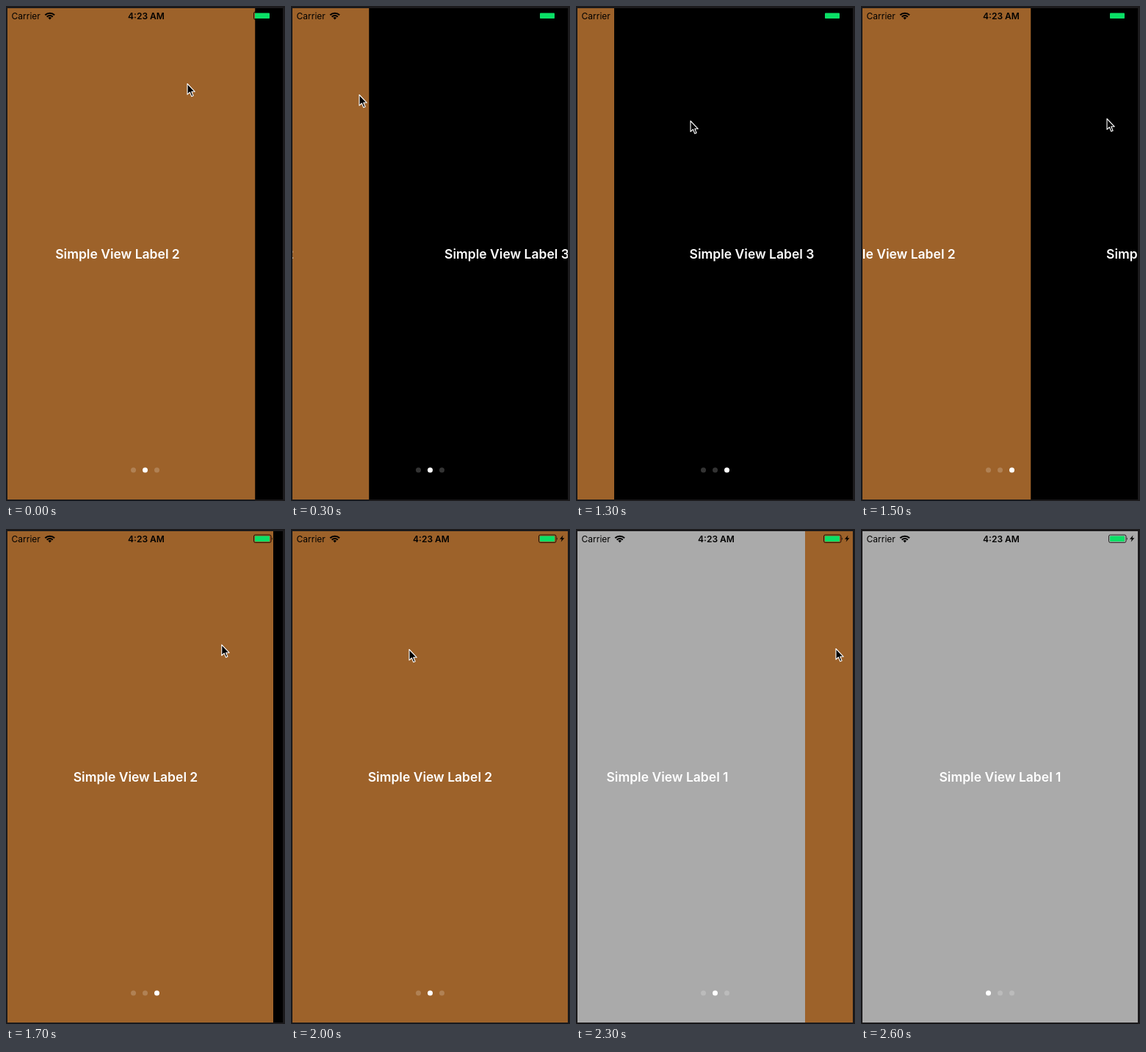
These frames come from a looping animation (380 px wide and 672 px high, 3000 ms). An HTML page:

```html
<!DOCTYPE html>
<html lang="en">
<head>
<meta charset="utf-8">
<title>Page view</title>
<style>
  html, body { margin: 0; width: 100%; height: 100%; overflow: hidden; background: #1b1a1c; }
  svg { display: block; width: 380px; height: 672px; }
  text { font-family: Inter, Roboto, sans-serif; }
  .label { font-size: 17.5px; font-weight: 600; fill: #fff; text-anchor: middle; }
  .status { font-size: 12px; }
  .time { font-weight: 600; text-anchor: middle; }
</style>
</head>
<body>
<svg viewBox="0 0 380 672">
  <defs>
    <clipPath id="screen"><rect x="2" y="3" width="375" height="667"/></clipPath>
  </defs>
  <g clip-path="url(#screen)">
    <rect x="2" y="3" width="375" height="667"/>
    <g id="pages"></g>
    <g class="status">
      <text x="7.6" y="17.6">Carrier</text>
      <g fill="none" stroke="#000" stroke-width="2">
        <path d="M53.3 12.3A9 9 0 0 1 66.1 12.3"/>
        <path d="M55.7 14.7A5.6 5.6 0 0 1 63.7 14.7"/>
      </g>
      <path d="M59.7 18.4L57.4 16.1A3.3 3.3 0 0 1 62 16.1Z"/>
      <text class="time" x="191" y="17.6">4:23 AM</text>
      <rect x="337.5" y="8" width="23.5" height="10.4" rx="2" fill="none" stroke="#000" stroke-opacity=".8"/>
      <path d="M362 11.3Q363.6 13.2 362 15.1Z"/>
      <rect x="339" y="9.5" width="20" height="7.5" rx=".8" fill="#0ae066"/>
      <path d="M370.6 8.6L366 13.8H368.8L367.7 17.6L372.4 12.3H369.5Z"/>
    </g>
    <g id="dots" fill="#fff"></g>
  </g>
  <path id="cursor" d="M0 0V14.6L3.4 11.5L5.8 17.2L8.1 16.2L5.8 10.8H10.3Z"
        stroke="#fff" stroke-width="1.1" stroke-linejoin="round"/>
</svg>
<script>
const NS = 'http://www.w3.org/2000/svg';
const WIDTH = 375, LOOP = 3000, STEP = 100;
const $ = id => document.getElementById(id);

function add(parent, tag, attrs, text = '') {
  const el = document.createElementNS(NS, tag);
  for (const key in attrs) el.setAttribute(key, attrs[key]);
  el.textContent = text;
  return parent.appendChild(el);
}

['#aaaaaa', '#9d622a', '#000000'].forEach((fill, i) => {
  const x = 2 + i * WIDTH;
  add($('pages'), 'rect', { x, y: 3, width: WIDTH, height: 667, fill });
  add($('pages'), 'text', { class: 'label', x: x + WIDTH / 2, y: 343 }, `Simple View Label ${i + 1}`);
});

const dots = [173.5, 189.5, 205.5].map(cx => add($('dots'), 'circle', { cx, cy: 630, r: 3.5 }));

// [time, value...]: straight runs between keys
const scroll = [
  [0, 412.5], [200, 566.5], [300, 645.5], [400, 714], [500, 743], [600, 750],
  [1200, 750], [1300, 700], [1400, 606], [1500, 520.5], [1600, 423], [1700, 388], [1800, 377], [1900, 375],
  [2000, 375], [2100, 306], [2200, 193.5], [2300, 65], [2400, 13.5], [2500, 2], [2600, 0]
];
const pointer = [
  [0, 247, 105.5], [200, 93, 120], [300, 93, 120.5], [400, 102, 125], [700, 269, 152],
  [800, 268, 155], [1100, 115, 158], [1200, 106, 157],
  [1300, 156, 156], [1500, 335, 153], [1600, 338, 155], [2000, 161, 163.5],
  [2200, 352, 165], [2400, 356, 160]
];
// [time, page]
const current = [[0, 1], [600, 2], [1900, 1], [2600, 0]];
const POINTER_END = 2500;

const lastKey = (keys, t) => keys.findLastIndex(k => k[0] <= t);

function at(keys, t) {
  const i = lastKey(keys, t), a = keys[i], b = keys[i + 1];
  if (!b) return a.slice(1);
  const f = (t - a[0]) / (b[0] - a[0]);
  return a.slice(1).map((v, n) => v + (b[n + 1] - v) * f);
}

function draw(now) {
  const t = Math.floor(now % LOOP / STEP) * STEP;
  const page = current[lastKey(current, t)][1];
  $('pages').setAttribute('transform', `translate(${-at(scroll, t)[0]})`);
  dots.forEach((dot, i) => dot.setAttribute('opacity', i === page ? 1 : 0.2));
  $('cursor').setAttribute('transform', `translate(${at(pointer, t)})`);
  $('cursor').setAttribute('visibility', t < POINTER_END ? 'visible' : 'hidden');
}

const start = performance.now();
function tick() {
  draw(performance.now() - start);
  requestAnimationFrame(tick);
}
tick();
</script>
</body>
</html>
```
